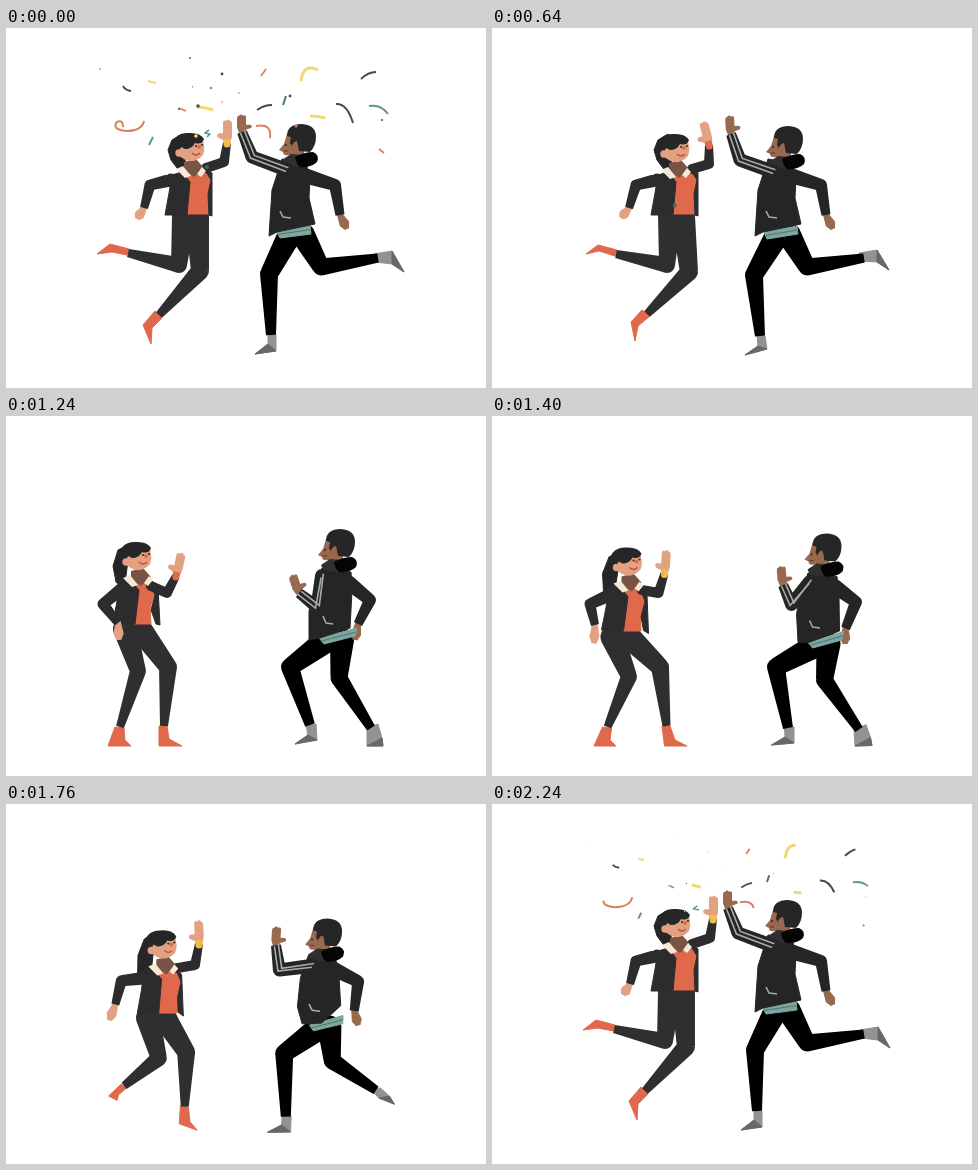
Animation, 480 px wide and 360 px high, one loop 2280 ms. Source, as an HTML page:

```html
<!DOCTYPE html>
<html lang="en">
<head>
<meta charset="utf-8">
<title>High five</title>
<style>
html, body { margin: 0; width: 100%; height: 100%; overflow: hidden; background: #fff; }
svg { display: block; width: 100vw; height: 100vh; }
</style>
</head>
<body>
<svg id="stage" viewBox="0 0 480 360"></svg>
<script>
const LOOP = 2280, LANDING = 1160;
const C = {
  coat: '#2c2c2e', slacks: '#2f2f31', hair: '#262628', orange: '#e0694b', skin: '#e2a282',
  shade: '#795444', cream: '#f4e8d6', brown: '#99694f', hoodie: '#252526', sock: '#929292',
  sole: '#686868', hem: '#7ca7a0', stripe: '#a9aaa9', yellow: '#efd977', teal: '#5d9793',
  dark: '#48494e', coral: '#d9805f'
};

// Poses: limbs run from the body outwards, feet are ankle-heel-tip-instep-ankle.
const wStand = {
  head: '131 143', hair: '112 134 124 128 120 160 117 172 110 166 107 150',
  flap: '113 164 124 164 133 174 129 208 107 207 111 185',
  shirt: '127 166 146 165 149 177 144 192 145 208 128 208',
  strip: '143 163 152 172 154 209 150 208 145 194 149 179',
  armL: '117 172 97 188 112 207 113 224', armR: '145 170 161 177 170 160 175 137',
  legL: '119 213 132 255 114 311', legR: '134 213 162 251 158 310',
  footL: '109 311 102 330 125 330 119 324 118 312', footR: '153 310 153 330 176 330 163 323 161 310'
};
const wCrouch = {
  head: '140 154', hair: '122 148 134 140 128 175 122 187 113 184 114 165',
  flap: '122 174 131 178 139 187 134 222 112 221 117 198',
  shirt: '133 179 153 178 157 190 153 208 153 222 134 222',
  strip: '152 176 158 185 159 226 153 221 153 207 157 192',
  armL: '121 185 99 188 94 211 91 231', armR: '154 178 172 177 175 155 173 132',
  legL: '122 229 142 266 117 311', legR: '140 229 174 251 191 310',
  footL: '112 311 102 330 123 330 117 324 121 313', footR: '187 310 192 330 214 330 203 325 195 310'
};
const wPart = {
  head: '184 122', hair: '166 112 176 106 180 140 174 144 165 132 162 122',
  flap: '166 147 176 144 184 154 181 187 159 187 163 165',
  shirt: '180 148 200 144 205 152 202 166 203 186 180 186',
  strip: '197 139 206 145 206 188 203 187 202 166 205 152',
  armL: '165 152 144 157 138 180 131 191', armR: '200 140 218 134 221 115 221 92',
  legL: '178 187 173 237 122 225', legR: '191 187 194 243 153 287',
  footL: '123 221 104 216 91 226 106 224 121 227', footR: '149 283 137 297 145 316 146 300 156 290'
};
const wClap = {
  ...wPart, head: '188 119', hair: '170 110 180 104 180 140 174 152 168 145 167 125',
  flap: '170 146 180 143 188 152 189 185 169 186 171 165',
  shirt: '184 146 203 141 210 150 207 165 206 184 187 184',
  strip: '202 137 210 143 213 185 209 183 208 166 210 150',
  armL: '171 151 151 157 145 180 135 190', armR: '204 137 222 130 228 111 229 87',
  legL: '181 185 174 231 120 225', legR: '195 185 192 242 155 288',
  footL: '121 220 104 218 88 231 104 226 119 228', footR: '150 285 137 300 147 319 147 304 158 291'
};
const wRest = {
  ...wPart, head: '183 123', armL: '165 152 144 157 137 180 129 190',
  armR: '200 141 217 136 217 117 211 94', legL: '178 188 175 237 124 226', legR: '191 188 197 244 155 286',
  footL: '125 222 106 217 94 226 107 223 123 228', footR: '150 282 139 294 143 313 146 298 158 288'
};

const mStand = {
  head: '329 131', torso: '316 152 345 156 346 175 344 212 314 222 303 224 303 195 310 172',
  hem: '313 222 351 212 349 220 318 228', pocket: '317 200 320 207 327 208',
  armL: '316 160 311 191 293 177 287 159', armR: '343 167 364 184 352 208 349 224',
  legL: '317 227 284 251 304 309', legR: '336 224 333 262 365 312',
  footL: '310 308 311 324 289 328 302 319 300 309', footR: '361 312 361 330 377 330 376 322 372 308'
};
const mCrouch = {
  head: '330 140', torso: '316 162 345 165 348 185 351 218 319 231 309 228 306 200 309 180',
  hem: '319 231 352 219 351 228 323 236', pocket: '318 209 321 215 329 216',
  armL: '320 172 288 186 289 161 292 142', armR: '344 175 364 188 355 217 357 232',
  legL: '325 235 284 251 288 315', legR: '337 232 332 266 369 315',
  footL: '294 314 293 330 270 330 284 323 285 314', footR: '363 317 365 330 383 329 381 321 376 309'
};
const mPart = {
  head: '290 114', torso: '276 131 300 135 304 150 303 170 309 196 271 204 263 208 266 162',
  hem: '270 203 304 197 305 206 274 210', pocket: '274 183 277 189 285 190',
  armL: '281 142 246 129 236 104 236 87', armR: '300 148 329 157 334 187 341 201',
  legL: '283 208 263 246 265 307', legR: '297 207 315 239 372 230',
  footL: '270 307 270 323 249 326 262 316 262 307', footR: '368 226 386 223 398 244 386 236 369 234'
};
const mClap = {
  ...mPart, head: '289 114', armL: '281 142 245 127 233 103 231 86', legL: '283 208 267 246 264 308',
  armR: '300 148 329 157 335 187 343 201', hem: '273 202 308 197 309 204 277 209',
  footL: '268 308 268 324 245 325 259 317 259 308', footR: '370 226 388 224 399 244 388 236 371 235'
};
const mRest = {
  ...mPart, head: '291 116', armL: '282 144 248 132 239 106 238 88', legL: '284 209 262 247 268 308',
  hem: '272 204 305 198 306 206 275 211',
  footL: '273 308 275 321 253 327 266 318 265 307', footR: '367 225 385 222 397 242 385 234 368 233'
};

const deepen = (pose, change) => ({ ...pose, ...change });
const timeline = (stand, crouch, deep, clap, part, rest) => [
  [0, stand], [80, stand], [400, crouch], [510, deep], [740, clap], [810, clap],
  [1070, part], [1130, part], [1480, rest], [LOOP, rest]
].map(([at, pose]) => [at, Object.fromEntries(Object.entries(pose).map(([k, v]) => [k, points(v)]))]);

function points(text) {
  const n = text.split(' ').map(Number);
  return n.flatMap((x, i) => i % 2 ? [] : [[x, n[i + 1]]]);
}
const mix = (a, b, u) => a + (b - a) * u;
const mixPoint = (a, b, u) => [mix(a[0], b[0], u), mix(a[1], b[1], u)];
const clamp = v => Math.max(0, Math.min(1, v));
const smooth = u => u * u * (3 - 2 * u);

const woman = timeline(wStand, wCrouch,
  deepen(wCrouch, { head: '140 156', armL: '121 186 97 187 91 211 87 230' }), wClap, wPart, wRest);
const man = timeline(mStand, mCrouch, deepen(mCrouch, { head: '330 142' }), mClap, mPart, mRest);

function poseAt(keys, time) {
  const i = Math.max(1, keys.findIndex(k => k[0] > time));
  const [t0, a] = keys[i - 1], [t1, b] = keys[i];
  const u = smooth(clamp((time - t0) / (t1 - t0)));
  return Object.fromEntries(Object.keys(a).map(k => [k, a[k].map((p, j) => mixPoint(p, b[k][j], u))]));
}

const path = (d, fill) => `<path d="${d}" fill="${fill}"/>`;
const line = (d, color, width, extra = '') =>
  `<path d="${d}" fill="none" stroke="${color}" stroke-width="${width}" ${extra}/>`;
const trace = pts => 'M' + pts.map(p => p.map(v => v.toFixed(2)).join(' ')).join('L');
const poly = (pts, fill) => `<path d="${trace(pts)}z" fill="${fill}" stroke="${fill}" stroke-width="1" stroke-linejoin="round"/>`;
const dot = (x, y, r, fill) => `<circle cx="${x}" cy="${y}" r="${r}" fill="${fill}"/>`;
const at = ([x, y], body, turn = 0) => `<g transform="translate(${x} ${y}) rotate(${turn})">${body}</g>`;

// A limb that tapers through its joints.
function limb(pts, widths, fill) {
  let d = '';
  for (let i = 0; i < pts.length - 1; i++) {
    const [x, y] = pts[i], [X, Y] = pts[i + 1];
    const len = Math.hypot(X - x, Y - y) || 1, nx = (y - Y) / len / 2, ny = (X - x) / len / 2;
    const r = widths[i] / 2, w = widths[i], W = widths[i + 1];
    d += trace([[x + nx * w, y + ny * w], [X + nx * W, Y + ny * W], [X - nx * W, Y - ny * W], [x - nx * w, y - ny * w]]) + 'z';
    d += `M${x - r} ${y}a${r} ${r} 0 1 0 ${2 * r} 0a${r} ${r} 0 1 0 ${-2 * r} 0`;
  }
  return path(d, fill);
}

function raisedHand(wrist, tip, side, fill) {
  const turn = Math.atan2(tip[0] - wrist[0], wrist[1] - tip[1]) * 180 / Math.PI;
  const k = Math.hypot(tip[0] - wrist[0], tip[1] - wrist[1]) / 21;
  return at(wrist, `<g transform="scale(${side} ${k})">` +
    path('M-3 1L-4-3L-9-5Q-11-8-8-9L-4-9L-4-19Q-3-22-1-20Q1-23 3-20Q5-20 5-17L5-6L3 1z', fill) + '</g>', turn);
}
const lowHand = ([wrist, tip], fill) => limb([wrist, mixPoint(wrist, tip, .6), tip], [6, 10, 5], fill);

function drawWoman(p, bracelet) {
  const wrist = p.armR[2];
  const head = path('M-6 12L6 9L14 18L4 27L-6 20z', C.shade) +
    path('M-14 19L-7 16L1 26L-5 28z M12 17L16 21L11 27L7 24z', C.cream) +
    path('M-10-8L12-13Q16-2 13 5Q7 12-1 11Q-8 9-11 5z', C.skin) +
    path('M-18 3Q-19-17-2-17Q10-18 14-11Q12-5 5-7Q2-1-5-1L-9-3Q-11 3-14 8z', C.hair) +
    dot(-11, 3, 3.7, C.skin) + dot(9, -3, 2, C.orange) + dot(6, -4, 1, C.hair) + dot(12, -5, 1, C.hair) +
    line('M2 3Q6 7 10 3', '#bd503d', 1.2);
  return poly(p.hair, C.hair) +
    poly(p.footL, C.orange) + poly(p.footR, C.orange) +
    limb(p.legL, [24, 16, 8], C.slacks) + limb(p.legR, [24, 18, 8], C.slacks) +
    poly(p.shirt, C.orange) + poly(p.flap, C.coat) + poly(p.strip, C.coat) +
    lowHand(p.armL.slice(2), C.skin) + limb(p.armL.slice(0, 3), [13, 11, 8], C.coat) +
    raisedHand(wrist, p.armR[3], 1, C.skin) + limb(p.armR.slice(0, 3), [10, 10, 8], C.coat) +
    limb([mixPoint(wrist, p.armR[3], -.04), mixPoint(wrist, p.armR[3], .17)], [7, 7], bracelet) +
    at(p.head[0], head);
}

function drawMan(p) {
  const foot = pts => poly(pts, C.sock) + poly(pts.slice(1, 4), C.sole);
  const sleeve = p.armL.slice(0, 3);
  const stripe = dx => line(trace(sleeve.map(([x, y], i) => [x + dx * (i ? 1 : .6), y - dx * (i ? .7 : 1)])), C.stripe, 1.6);
  const face = path('M-9-8L-12 2L-17 8L-13 10Q-13 14-7 13L-5 20L8 18L8-5z', C.brown) +
    path('M-9-6Q-9-18 6-18Q20-17 20-5Q20 4 14 10L3 9L1-1L-2 0L-3 6L-6 1L-5-5z', C.hair) +
    dot(-1, 4, 3, C.brown) + dot(-10, 3, 1, C.hair) + line('M-12 9L-8 9', '#573629', 1);
  const hood = path('M-14 18L-5 12L8 13L9 25L-11 24z', '#303031') +
    path('M-1 15Q8 10 17 10Q24 13 21 20Q15 26 4 25Q0 22-1 15z', '#050505');
  return foot(p.footL) + foot(p.footR) +
    limb(p.legR, [24, 17, 9], '#000') + limb(p.legL, [24, 18, 10], '#000') +
    lowHand(p.armR.slice(2), C.brown) + limb(p.armR.slice(0, 3), [15, 12, 9], C.hoodie) +
    poly(p.hem, C.hem) + line(trace([mixPoint(p.hem[0], p.hem[3], .5), mixPoint(p.hem[1], p.hem[2], .5)]), '#4f756f', 1) +
    poly(p.torso, C.hoodie) + line(trace(p.pocket), C.stripe, 1.6, 'stroke-linejoin="round"') +
    at(p.head[0], face + hood) +
    raisedHand(p.armL[2], p.armL[3], -1, C.brown) + limb(sleeve, [14, 13, 10], C.hoodie) + stripe(-1.5) + stripe(2.3);
}

// Ribbons: path, colour, width, time it starts to retract, time it is gone, time it appears.
const ribbons = [
  ['M125 63Q119 62 117 58', C.dark, 1.8, 60, 200],
  ['M150 55L142 53', C.yellow, 2, 80, 220],
  ['M187 59Q183 57 179 50Q174 49 172 50', C.teal, 1.8, 330, 480, -20, 330],
  ['M255 48L260 41', C.coral, 1.8, 60, 220],
  ['M295 53Q297 35 312 42', C.yellow, 3, 50, 260],
  ['M355 51Q362 44 370 44', C.dark, 1.8, 60, 260],
  ['M330 76Q341 75 347 95', C.dark, 2, 340, 520],
  ['M363 78Q375 76 382 86', C.teal, 2, 80, 320],
  ['M304 88Q312 88 319 90', C.yellow, 3, 70, 240, -80],
  ['M373 121L378 125', C.coral, 1.8, 60, 220, -60],
  ['M251 82Q258 77 266 77', C.dark, 1.8, 40, 200],
  ['M277 77L280 68', '#4f7373', 2, 50, 200],
  ['M250 98Q266 95 264 110', C.coral, 2, 30, 200],
  ['M138 93Q136 103 120 103Q105 101 111 94Q117 91 117 99', C.coral, 2, 30, 240],
  ['M147 109L143 117', C.teal, 2, 60, 200],
  ['M207 82Q199 79 191 79', C.yellow, 3, 60, 240, -90],
  ['M180 83L173 80', C.coral, 1.8, 60, 220],
  ['M203 102L199 105L204 106L201 109', C.teal, 1.6, 30, 160],
  ['M298 57Q296 52 300 47', C.coral, 1.8, 330, 460, 140, 300]
];
// Dots: x, y, radius, colour, time gone.
const dots = [
  [94, 41, .7, C.dark, 360], [184, 30, .9, C.dark, 300], [216, 46, 1.4, C.dark, 470], [205, 60, 1.2, C.teal, 600],
  [192, 78, 1.7, C.dark, 560], [173, 81, 1, C.dark, 540], [216, 74, .8, C.coral, 400], [233, 65, .8, C.teal, 300],
  [284, 68, 1.4, C.dark, 260], [376, 92, 1, C.dark, 540], [190, 108, 1.8, C.yellow, 180], [290, 98, 1.5, C.coral, 120]
];

function drift(x, y, time) {
  const dx = x - 230, dy = y - 100, len = Math.hypot(dx, dy), s = time * .056 / len;
  return [dx * s, dy * s];
}

function drawConfetti(time) {
  let out = '';
  for (const [d, color, width, fade, end, born = -150, grown = 0] of ribbons) {
    const tip = clamp((time - born) / (grown - born)), tail = clamp((time - fade) / (end - fade));
    if (tip <= tail) continue;
    const [x, y] = d.match(/\d+/g).map(Number);
    out += at(drift(x, y, time), line(d, color, width,
      `pathLength="1" stroke-dasharray="0 ${tail} ${tip - tail} 2" stroke-linejoin="round"`));
  }
  for (const [x, y, r, color, end] of dots) {
    const size = r * clamp((time + 60) / 60) * clamp((end - time) / 60);
    const [dx, dy] = drift(x, y, time * 1.2);
    if (size > 0) out += dot(x + dx, y + dy, size, color);
  }
  if (time >= 0) {
    const fall = time < 360 ? mixPoint([201, 139], [187, 166], time / 360) : mixPoint([187, 166], [178, 190], (time - 360) / 600);
    out += dot(...fall, 2, '#4f6258');
  }
  return out;
}

const stage = document.getElementById('stage');
function render(now) {
  const time = now % LOOP, sinceLanding = (time - LANDING + LOOP) % LOOP;
  const burst = time < LANDING ? time : time - LOOP;
  const yellow = Math.abs(burst) < 120 || (time > 1320 && time < 1780);
  stage.innerHTML = drawWoman(poseAt(woman, sinceLanding), yellow ? '#efbd48' : C.orange) +
    drawMan(poseAt(man, sinceLanding)) + drawConfetti(burst);
}

let start;
function tick(now) {
  start ??= now;
  render(now - start);
  requestAnimationFrame(tick);
}
render(0);
requestAnimationFrame(tick);
</script>
</body>
</html>
```
